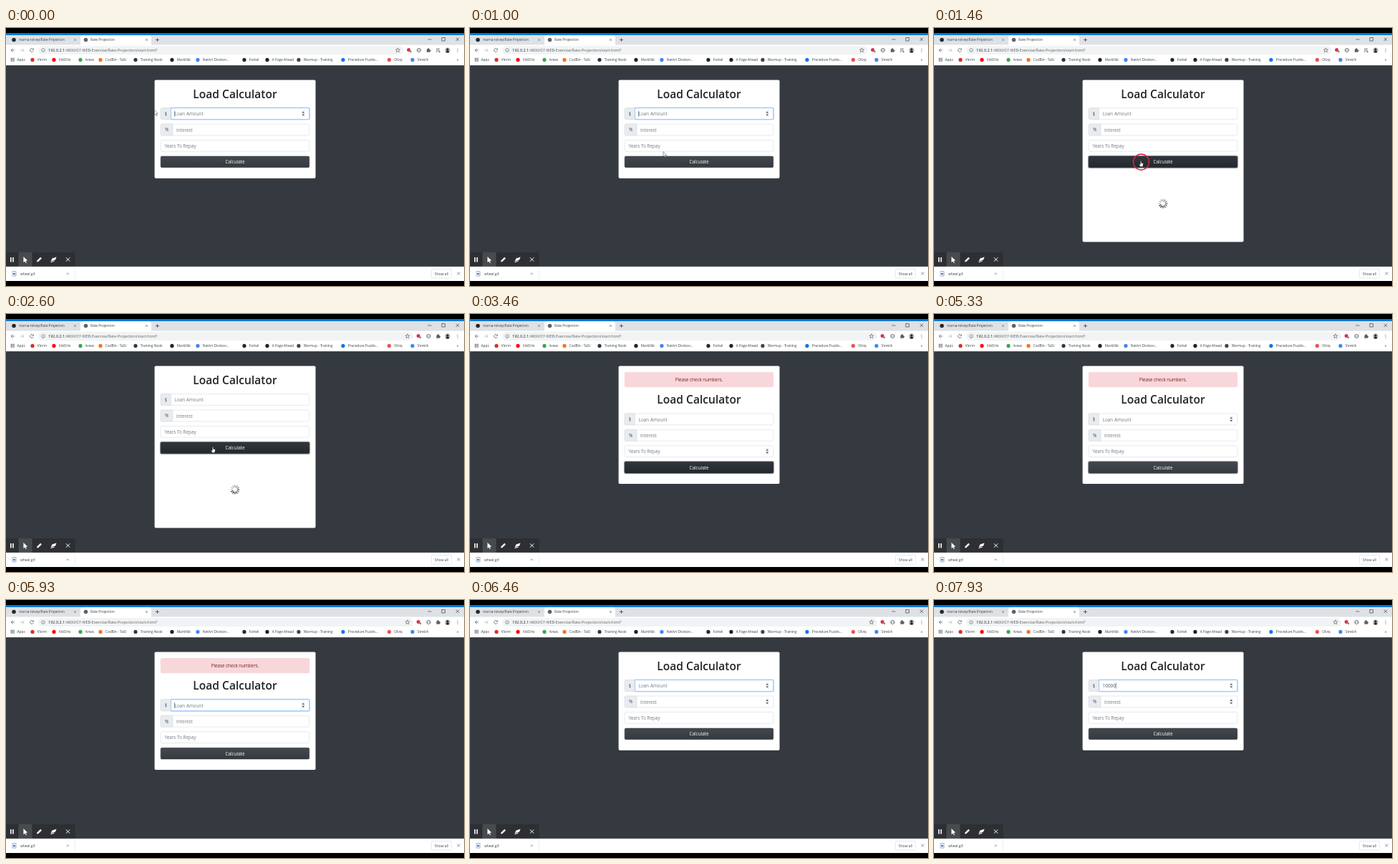
Recreate the animation shown at these times as an HTML page with a canvas. Size 640x360 px, loop 8 s.

```html
<!DOCTYPE html>
<html lang="en">
<head>
<meta charset="utf-8">
<title>Calculator</title>
<style>
  html, body { margin: 0; width: 100%; height: 100%; overflow: hidden; background: #000; }
  canvas { display: block; }
</style>
</head>
<body>
<canvas id="stage" width="640" height="360"></canvas>
<script>
const ctx = document.getElementById('stage').getContext('2d');
const LOOP = 8000, PRESS = 1400, LOAD = 1460, FAIL = 3460, REFOCUS = 5600, CLEAR = 6460;
const KEYS = [6930, 7130, 7330, 7530, 7730];
const GREY = '#5f6368', INK = '#3c4043';

// Pointer stops: time, x, y
const PATH = [
  [0, 207.5, 114.5], [60, 207.5, 114.5], [660, 262, 167], [860, 262, 167], [1250, 289, 185.5],
  [4060, 289, 185.5], [4460, 289, 171], [4600, 289, 171], [5200, 289, 145], [LOOP, 289, 145]
];

// Bookmarks: icon x, icon colour, label
const BOOKMARKS = [
  [37, '#d93025', 'Vlorm'], [67, '#f00', 'VidOrlo'], [104, '#34a853', 'Areas'],
  [132, '#fc6d26', 'CodBin - TalU'], [181, '#2b3a4a', 'Training Nook'], [232, '#222', 'MarkNib'],
  [268, '#4285f4', 'NetArt Division...'], [333, '#24292e', 'Forkel'], [365, '#222', 'A Page Ahead'],
  [409, '#444', 'Warmup - Training'], [471, '#1a73e8', 'Procedure Puzzle...'],
  [535.5, '#ec5252', 'Olviq'], [568, '#4285f4', 'Stretch']
];

const clamp = v => Math.max(0, Math.min(1, v));
const ramp = (t, from, to) => clamp((t - from) / (to - from));
const ease = p => p * p * (3 - 2 * p);
const inside = (p, x, y, w, h) => p.x >= x && p.x <= x + w && p.y >= y && p.y <= y + h;

function box(x, y, w, h, r, fill, stroke, width = 0.5) {
  ctx.beginPath();
  ctx.roundRect(x, y, w, h, r);
  if (fill) { ctx.fillStyle = fill; ctx.fill(); }
  if (stroke) { ctx.strokeStyle = stroke; ctx.lineWidth = width; ctx.stroke(); }
}

function dot(x, y, r, fill, stroke, width = 0.8) {
  box(x - r, y - r, 2 * r, 2 * r, r, fill, stroke, width);
}

function trace(points) {
  ctx.beginPath();
  for (let i = 0; i < points.length; i += 2) ctx.lineTo(points[i], points[i + 1]);
}

function line(points, color, width = 0.8) {
  trace(points);
  ctx.strokeStyle = color;
  ctx.lineWidth = width;
  ctx.stroke();
}

function shape(points, fill, stroke, width = 0.5) {
  trace(points);
  ctx.closePath();
  ctx.fillStyle = fill;
  ctx.fill();
  if (stroke) { ctx.strokeStyle = stroke; ctx.lineWidth = width; ctx.stroke(); }
}

function label(text, x, y, size, color, align = 'left', weight = 400) {
  ctx.font = `${weight} ${size}px "Open Sans", "Noto Sans", sans-serif`;
  ctx.textAlign = align;
  ctx.fillStyle = color;
  ctx.fillText(text, x, y);
  return ctx.measureText(text).width;
}

function cross(x, y, r, color, width) {
  line([x - r, y - r, x + r, y + r], color, width);
  line([x - r, y + r, x + r, y - r], color, width);
}

function at(x, y, draw) {
  ctx.save();
  ctx.translate(x, y);
  draw();
  ctx.restore();
}

function star(x, y) {
  const pts = [];
  for (let i = 0; i < 10; i++) {
    const a = i * Math.PI / 5 - Math.PI / 2, r = i % 2 ? 1.4 : 3.2;
    pts.push(x + r * Math.cos(a), y + r * Math.sin(a));
  }
  shape(pts, '#f1f3f4', GREY, 0.7);
}

function drawTabs() {
  box(0, 7, 640, 3, 0, '#0078d7');
  box(0, 10, 640, 14, 0, '#dee1e6');
  dot(11, 16.5, 2.8, '#24292e');
  label('marna-tolvey/Rate-Projection', 18, 18.3, 4.7, INK);
  cross(96.5, 16.5, 1.4, GREY, 0.7);
  box(104, 10.5, 99, 14, [3, 3, 0, 0], '#fff');
  dot(111.5, 16.5, 2.8, GREY);
  label('Rate Projection', 118, 18.3, 4.8, INK);
  cross(196.5, 16.5, 1.4, GREY, 0.7);
  line([209, 16.5, 214, 16.5], INK);
  line([211.5, 14, 211.5, 19], INK);
  line([589.5, 16, 594.5, 16], '#222', 0.6);
  box(609, 13.5, 4.5, 4.5, 0, null, '#222', 0.6);
  cross(631, 15.8, 2.2, '#222', 0.6);
}

function drawToolbar(t) {
  box(0, 23.5, 640, 29, 0, '#fff');
  line([9.5, 28.6, 7, 31, 9.5, 33.4], GREY);
  line([7, 31, 12, 31], GREY);
  line([22.5, 28.6, 25, 31, 22.5, 33.4], '#bbb');
  line([20, 31, 25, 31], '#bbb');
  ctx.beginPath();
  ctx.arc(36, 31, 2.4, 0.4, 5.6);
  ctx.strokeStyle = GREY;
  ctx.lineWidth = 0.8;
  ctx.stroke();
  shape([36.6, 30.4, 38.8, 30.4, 38.8, 28.2], GREY);

  const media = t < 2100, shift = media ? -13.5 : 0;
  box(45, 25.3, 524 + shift, 11.6, 5.8, '#f1f3f4');
  dot(52, 31, 2.4, null, GREY, 0.6);
  line([52, 30.7, 52, 32.4], GREY, 0.6);
  const host = label('192.0.2.1', 59, 33, 5.5, '#202124');
  label(':4800/07-WEB-Exercise/Rate-Projection/start.html?', 59 + host, 33, 5.5, GREY);
  star(561 + shift, 31);

  at(577 + shift, 31, () => {
    dot(-0.8, -0.6, 2.5, '#d8354a');
    box(0.6, 0.4, 2.6, 2.6, 0.5, '#8a8d91');
  });
  dot(590.5 + shift, 31, 2.6, '#fff', GREY, 0.9);
  line([588 + shift, 31, 593 + shift, 31], GREY, 0.6);
  at(604 + shift, 31, () => {
    box(-2.6, -1.6, 4.6, 4.4, 0.6, GREY);
    dot(-0.3, -1.8, 1.1, GREY);
    dot(2.1, 0.6, 1.1, GREY);
  });
  if (media) {
    for (let i = 0; i < 3; i++) line([601, 29 + 2 * i, i < 2 ? 606 : 603.5, 29 + 2 * i], GREY);
    dot(605.6, 33, 1, GREY);
  }
  dot(617, 31, 3.8, '#c9bdb8');
  dot(617, 30, 1.7, '#30282a');
  box(614.8, 31.4, 4.4, 3, [2, 2, 1, 1], '#30282a');
  for (let i = -1; i < 2; i++) dot(631, 31 + 2 * i, 0.6, GREY);

  for (let i = 0; i < 9; i++) {
    box(6.6 + (i % 3) * 1.9, 41.7 + Math.floor(i / 3) * 1.9, 1.3, 1.3, 0, GREY);
  }
  label('Apps', 15.5, 46.2, 4.8, INK);
  for (const [x, color, text] of BOOKMARKS) {
    dot(x, 44.4, 2.6, color);
    label(text, x + 6.8, 46.2, 4.75, INK);
  }
  label('»', 631, 46, 5.5, INK, 'center');
}

function drawRecorder() {
  box(0, 313, 96.5, 20, [0, 2, 0, 0], '#2d2f32');
  box(17.5, 313, 19, 20, 0, '#484b4e');
  box(6, 320, 1.6, 6.5, 0, '#fff');
  box(9.2, 320, 1.6, 6.5, 0, '#fff');
  shape([24.4, 319, 24.4, 327, 26.3, 325.4, 27.6, 328, 28.8, 327.4, 27.6, 324.9, 30, 324.6], '#fff');
  shape([43, 326.6, 43.6, 324.3, 48.2, 319.7, 49.9, 321.4, 45.3, 326], '#fff');
  shape([62.5, 325.5, 64.5, 321.5, 70.5, 319.5, 69, 323.5], '#fff');
  line([62.5, 326.7, 67.5, 325.2], '#fff', 1);
  cross(86.5, 323, 2.6, '#fff', 1);
}

function drawDownloads() {
  box(0, 333, 640, 20, 0, '#fff');
  line([0, 333.2, 640, 333.2], '#d5d7da', 0.5);
  box(9, 339.5, 5, 6.5, 0.5, '#fff', '#777', 0.6);
  box(10, 341.8, 3, 2.4, 0, '#4285f4');
  label('wheel.gif', 20, 344.8, 4.9, INK);
  line([84.6, 343.7, 86.3, 342, 88, 343.7], GREY);
  line([96.5, 336, 96.5, 350], '#dadce0', 0.5);
  box(594.5, 336.5, 28, 12.5, 1.5, '#fff', '#dadce0', 0.6);
  label('Show all', 608.5, 344.5, 4.9, INK, 'center');
  cross(632.5, 342.5, 1.9, GREY, 0.7);
}

function drawField(y, split, sign, hint, { focus, hover, value }) {
  if (focus) box(214.9 + split, y - 1.2, 210.2 - split, 18.2, 2.4, '#bfdeff');
  box(216.2, y, 207.6, 15.8, 1.7, '#fff', '#ced4da');
  if (split) {
    box(216.2, y, split, 15.8, [1.7, 0, 0, 1.7], '#e9ecef', '#ced4da');
    label(sign, 216.2 + split / 2, y + 10.4, 6.3, '#495057', 'center');
  }
  if (focus) box(216.2 + split, y, 207.6 - split, 15.8, [0, 1.7, 1.7, 0], '#fff', '#80bdff', 0.8);
  const x = 221.4 + split;
  const width = label(value || hint, x, y + 10.6, 6.35, value ? '#495057' : '#737b83');
  if (focus === 'caret') {
    const end = value ? x + width + 0.3 : x - 0.1;
    line([end, y + 4, end, y + 12], '#333', 0.6);
  }
  if (focus || hover) {
    box(412.8, y + 3.6, 5, 8.6, 0, '#f0f0f0');
    shape([413.7, y + 6.9, 415.3, y + 4.8, 416.9, y + 6.9], '#444');
    shape([413.7, y + 8.9, 415.3, y + 11, 416.9, y + 8.9], '#444');
  }
}

function drawButton(y, t) {
  const dark = ramp(t, 1080, 1230) - ramp(t, FAIL, FAIL + 150);
  const shade = (r, g, b) => `rgb(${[r, g, b].map(v => v - 18 * dark).join()})`;
  if (t >= PRESS && t < REFOCUS) box(214.9, y - 1.3, 210.2, 18.2, 2.6, '#a9acaf');
  const fill = ctx.createLinearGradient(0, y, 0, y + 15.6);
  fill.addColorStop(0, shade(66, 72, 77));
  fill.addColorStop(1, shade(52, 58, 64));
  box(216.2, y, 207.6, 15.6, 1.7, fill, shade(48, 54, 60), 0.6);
  label('Calculate', 320, y + 10.4, 6.4, '#fff', 'center');
}

function drawSpinner(t) {
  const head = 8 + Math.floor((t - LOAD) / 95);
  ctx.lineCap = 'round';
  for (let i = 0; i < 12; i++) {
    const age = ((head - i) % 12 + 12) % 12;
    const a = i * Math.PI / 6 - Math.PI / 2, c = Math.cos(a), s = Math.sin(a);
    const tone = 30 + age * 16;
    line([320 + 3.6 * c, 245 + 3.6 * s, 320 + 6 * c, 245 + 6 * s], `rgb(${tone},${tone},${tone})`, 1.3);
  }
  ctx.lineCap = 'butt';
}

function pointerAt(t) {
  const i = PATH.findIndex(stop => stop[0] > t);
  const [t0, x0, y0] = PATH[i - 1], [t1, x1, y1] = PATH[i];
  const p = ease(ramp(t, t0, t1));
  return { x: x0 + (x1 - x0) * p, y: y0 + (y1 - y0) * p };
}

function drawPointer(p, hand) {
  at(p.x, p.y, () => {
    if (hand) {
      shape([-0.6, 0, 0.6, 0, 0.7, 2.8, 3, 3.3, 3.4, 4, 3, 6.4, 2.4, 8, -0.6, 8, -2.3, 5.2, -2, 4.4, -0.7, 5],
        '#fff', '#111', 0.4);
    } else {
      shape([0, 0, 0, 7, 1.6, 5.5, 2.7, 8, 3.7, 7.6, 2.6, 5.1, 4.9, 5.1], '#fff', '#111', 0.4);
    }
  });
}

function drawRing(age, p) {
  if (age < 0 || age > 300) return;
  ctx.globalAlpha = 1 - ramp(age, 120, 300);
  dot(p.x + 0.5, p.y + 1.5, 8 + 3 * ramp(age, 0, 60), null, '#d3263f', 1.5);
  ctx.globalAlpha = 1;
}

function drawPage(t) {
  const loading = t >= LOAD && t < FAIL, failed = t >= FAIL && t < CLEAR;
  const drop = failed ? 27.3 : 0;
  const p = pointerAt(t);
  const rows = [111.6, 134, 156.4].map(y => y + drop), buttonY = 179 + drop;
  const hovers = rows.map(y => inside(p, 216.2, y, 207.6, 15.8));

  const typed = KEYS.filter(k => k <= t).length;
  const lastInput = typed ? KEYS[typed - 1] : t < PRESS ? 0 : REFOCUS;
  const caret = (t - lastInput) % 1000 < 500;
  const focus = (t < PRESS || t >= REFOCUS) && (caret ? 'caret' : 'plain');

  box(0, 52.3, 640, 281, 0, '#343a40');
  box(207.6, 72.4, 225, loading ? 226.2 : 137.4 + drop, 1.8, '#fff');
  if (failed) {
    box(216.2, 81.5, 207.6, 20.3, 1.7, '#f8d7da', '#f5c6cb');
    label('Please check numbers.', 320, 94.3, 6.25, '#721c24', 'center');
  }
  label('Load Calculator', 320, 97.8 + drop, 15.6, '#212529', 'center', 600);
  drawField(rows[0], 14.3, '$', 'Loan Amount', { focus, hover: hovers[0], value: '10000'.slice(0, typed) });
  drawField(rows[1], 16.7, '%', 'Interest', { hover: hovers[1] });
  drawField(rows[2], 0, '', 'Years To Repay', { hover: hovers[2] });
  drawButton(buttonY, t);
  if (loading) drawSpinner(t);

  drawRing(t - PRESS, p);
  drawRing(t - REFOCUS, p);
  if (!hovers.includes(true)) drawPointer(p, inside(p, 216.2, buttonY, 207.6, 15.6));
}

function frame() {
  const t = performance.now() % LOOP;
  box(0, 0, 640, 360, 0, '#000');
  drawTabs();
  drawToolbar(t);
  drawPage(t);
  drawRecorder();
  drawDownloads();
  requestAnimationFrame(frame);
}
frame();
</script>
</body>
</html>
```
